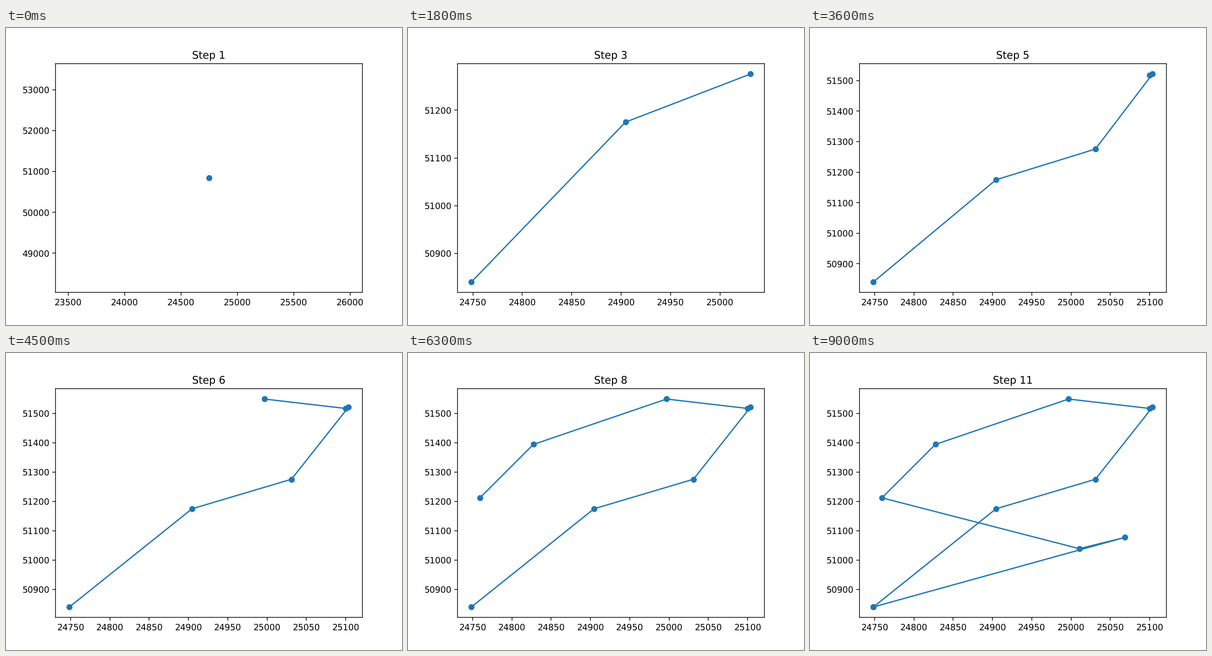
Write a matplotlib script that moves like this. It is 864 px wide and 648 px high and loops after 9900 ms.

```python
import matplotlib.pyplot as plt
from matplotlib.animation import FuncAnimation

STEP_MS = 900
START = 24748.5, 50840.4

# Stops as offsets from the start; the route closes on itself.
OFFSETS = [(0, 0), (156, 334.7), (282.4, 435.3), (355, 681), (351.4, 676.8),
           (248.2, 708.9), (78.8, 554.1), (10.8, 372), (261.9, 198.7),
           (319.7, 236.9), (0, 0)]
route = [(START[0] + dx, START[1] + dy) for dx, dy in OFFSETS]

# Smooth, unsnapped outlines and unhinted glyphs.
plt.rcParams.update({"path.snap": False, "text.hinting": "none"})
fig, ax = plt.subplots(figsize=(6.4, 4.8), dpi=135)


def draw(i):
    ax.clear()
    xs, ys = zip(*route[:i + 1])
    ax.plot(xs, ys, "o-", color="tab:blue")
    ax.set_title(f"Step {i + 1}")


anim = FuncAnimation(fig, draw, frames=len(route), init_func=lambda: None,
                     interval=STEP_MS, repeat=True, repeat_delay=0)
plt.show()
```
